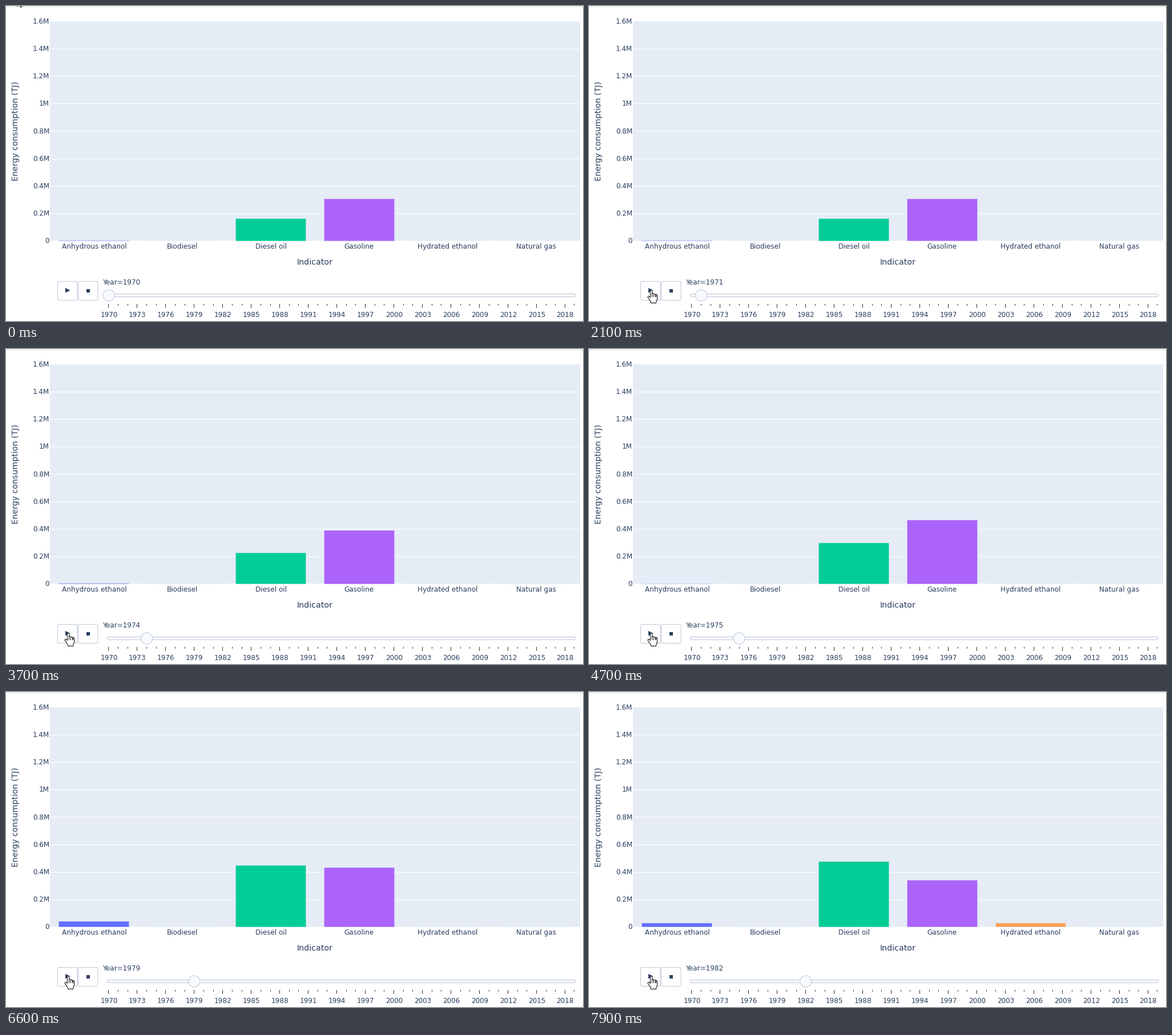
A matplotlib script for the animation above (8000 ms loop, 1011x553 px).

```python
import numpy as np
import matplotlib.pyplot as plt
from matplotlib.animation import FuncAnimation
from matplotlib.patches import Circle, FancyBboxPatch, Polygon, Rectangle

W, H = 1011, 553
FRAMES, INTERVAL = 80, 100
INK, BORDER, PANEL, PALE = "#2a3f5f", "#bec8d9", "#e5ecf6", "#f8fafc"

LEFT, RIGHT, TOP, BASE = 77, 1006, 27.1, 412.7
SLOT = (RIGHT - LEFT) / 6
PER_MILLION = (BASE - TOP) / 1.6

# Consumption in thousand TJ at a few key years; the years between are linear
KEY_YEARS = [1970, 1972, 1975, 1977, 1979, 1982]
FUELS = {
    "Anhydrous ethanol": ("#636efa", [4, 7, 3, 12, 42, 23]),
    "Biodiesel": ("#ef553b", [0] * 6),
    "Diesel oil": ("#00cc96", [164, 191, 300, 393, 450, 490]),
    "Gasoline": ("#ab63fa", [308, 354, 467, 428, 434, 298]),
    "Hydrated ethanol": ("#ffa15a", [0, 0, 0, 0, 0, 44]),
    "Natural gas": ("#19d3f3", [0] * 6),
}

# Playback: the first step, the steps' spacing and the bars' travel, in frames
FIRST_STEP, STEP, TRAVEL = 21, 5.21, 3.5

SLIDER_X, YEAR_WIDTH, SLIDER_Y = 179.9, 16.655, 508

plt.rcParams["font.family"] = "DejaVu Sans"
fig = plt.figure(figsize=((W + .01) / 72, (H + .01) / 72), dpi=72, facecolor="white")
ax = fig.add_axes([0, 0, 1, 1])
ax.set_xlim(0, W)
ax.set_ylim(H, 0)
ax.axis("off")


def rect(x, y, w, h, color, z=1):
    ax.add_patch(Rectangle((x, y), w, h, fc=color, lw=0, zorder=z))


def rounded(x, y, w, h, radius, fill):
    style = f"round,pad=0,rounding_size={radius}"
    ax.add_patch(FancyBboxPatch((x, y), w, h, boxstyle=style, fc=fill,
                                ec=BORDER, lw=1, zorder=2))


def label(x, y, text, size=12, ha="center", va="baseline", **kw):
    return ax.text(x, y, text, size=size, ha=ha, va=va, color=INK, zorder=5, **kw)


def draw_chart():
    rect(0, 1, W, 1, "#dddddd")
    rect(LEFT, 27, RIGHT - LEFT, 385, PANEL)
    for i in range(9):
        y = BASE - i * PER_MILLION / 5
        if 0 < i < 8:
            rect(LEFT, int(y), RIGHT - LEFT, 1, "white", 2)
        label(76, round(y + 3.7), f"{i / 5:g}M" if i else "0", ha="right")
    for i, name in enumerate(FUELS):
        label(LEFT + (i + .5) * SLOT, 426, name)
    label(541.5, 454, "Indicator", 14.3)
    label(16.5, 219.5, "Energy consumption (TJ)", 14.3, va="center", rotation=90)


def draw_controls():
    for x in (90.5, 126.5):
        rounded(x, 483.5, 34.5, 33, 2.5, "white")
    ax.add_patch(Polygon([(104, 495), (112.5, 499.2), (104, 503.4)],
                         fc=INK, lw=0, zorder=3))
    rect(141, 497, 6, 6, INK, 3)
    rounded(177.5, 505.5, 820, 5, 2, PALE)
    for i in range(50):
        x = SLIDER_X + i * YEAR_WIDTH
        rect(round(x - .5), 523, 1, 3 if i % 3 else 7, "#333333", 2)
        if i % 3 == 0:
            label(x + .5, 546, str(1970 + i))


def draw_hand():
    """Strokes with round ends: a black layer first, a thinner white one on top."""
    fingers = [((108.5, 108.5), (499.8, 515)), ((104.6, 108.5), (511, 516.5))]
    fingers += [((x, x), (y, 515)) for x, y in ((111.8, 506.2), (115, 507), (118, 508.5))]
    palm = [(107.5, 511), (119, 511), (117, 520.8), (109, 520.8)]
    parts = []
    for color, grow, z in (("black", 2, 8), ("white", 0, 9)):
        parts.append(ax.add_patch(Polygon(palm, fc=color, ec=color, lw=grow + .2, zorder=z)))
        for xs, ys in fingers:
            parts += ax.plot(xs, ys, color=color, lw=2.2 + grow, zorder=z,
                             solid_capstyle="round")
    for x in (110.2, 113.4, 116.5):
        parts += ax.plot([x, x], [506, 510], color="black", lw=.9, zorder=10)
    return parts


draw_chart()
draw_controls()
hand = draw_hand()

bars = []
for i, (color, _) in enumerate(FUELS.values()):
    x0, x1 = (round(LEFT + (i + side) * SLOT) for side in (.1, .9))
    bar = Rectangle((x0 + .25, 412.75), x1 - x0 - .5, 0, fc=color, ec=PANEL,
                    lw=.5, snap=False, zorder=3)
    bars.append(ax.add_patch(bar))

grip = ax.add_patch(Circle((SLIDER_X, SLIDER_Y), 10, fc=PALE, ec=BORDER, lw=1, zorder=4))
year_text = label(170, 489, "", ha="left")

ARROW = np.array([(.5, .5), (.5, 16.5), (4, 12.8), (6.4, 18.3), (8.9, 17.2),
                  (6.6, 12), (11.3, 11.6)])
arrow = ax.add_patch(Polygon(ARROW, fc="white", ec="black", lw=1, zorder=8))


def cubic_in_out(p):
    return 4 * p ** 3 if p < .5 else 1 - 4 * (1 - p) ** 3


def playback(k):
    """Year on the slider, and the year the bars show on their way to it."""
    steps = (k - FIRST_STEP) / STEP
    if steps < 0:
        return 1970, 1970
    done = int(steps)
    moved = min(1, (steps - done) * STEP / TRAVEL)
    return 1971 + done, 1970 + done + cubic_in_out(moved)


def arrow_tip(k):
    t = np.clip((k - 2) / 7, 0, 1)
    path = np.array([(19, -16), (110, 120), (275, 380), (108, 500)])
    weights = [(1 - t) ** 3, 3 * t * (1 - t) ** 2, 3 * t * t * (1 - t), t ** 3]
    return np.round(weights @ path)


def fuel_value(keys, shown):
    """Blend the two whole years around the shown moment."""
    year = int(shown)
    a, b = np.interp([year, year + 1], KEY_YEARS, keys)
    return (a + (b - a) * (shown - year)) / 1000


def update(k):
    year, shown = playback(k)
    for bar, (_, keys) in zip(bars, FUELS.values()):
        height = fuel_value(keys, shown) * PER_MILLION
        bar.set_y(BASE - height)
        bar.set_height(height)
    grip.set_center((SLIDER_X + (year - 1970) * YEAR_WIDTH, SLIDER_Y))
    year_text.set_text(f"Year={year}")
    pressing = k >= 11
    arrow.set_visible(not pressing)
    arrow.set_xy(ARROW + arrow_tip(k))
    for part in hand:
        part.set_visible(pressing)
    return [*bars, grip, year_text, arrow, *hand]


anim = FuncAnimation(fig, update, frames=FRAMES, interval=INTERVAL,
                     repeat=True, repeat_delay=0, blit=False)
plt.show()
```
